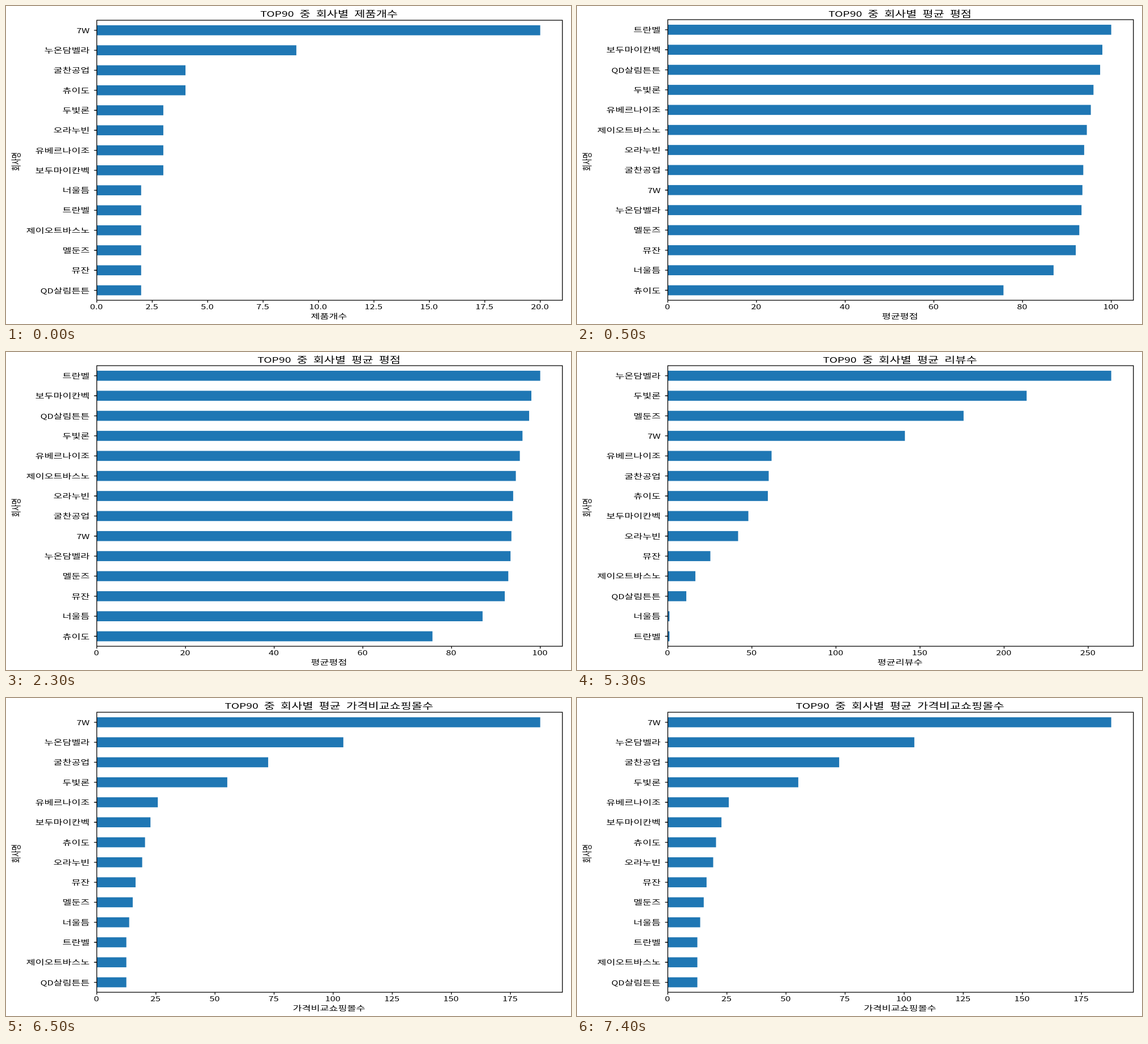
An HTML page that plays this animation: 998 px wide and 561 px high, repeating every 8 s.

```html
<!DOCTYPE html>
<html lang="ko">
<head>
<meta charset="utf-8">
<style>
  html, body { margin: 0; width: 100%; height: 100%; overflow: hidden; background: #fff; }
  svg { display: block; }
  text { font: 12px "Noto Sans CJK KR", "Noto Sans CJK", sans-serif; word-spacing: .2em; text-anchor: middle; }
  tspan { font-size: .93em; }
  .title { font-size: 14.4px; }
  .name { text-anchor: end; }
  .bar { fill: #1f77b4; }
  .axes { fill: none; stroke: #000; stroke-width: 1.3; }
</style>
</head>
<body>
<svg id="stage" width="998" height="561" viewBox="0 0 998 561"></svg>
<script>
const LEFT = 160.4, RIGHT = 982.8, BOTTOM = 519.2, STRETCH = 1.45;

const names = ['7W', '누온담벨라', '굴찬공업', '츄이도', '두빛론', '오라누빈', '유베르나이조',
  '보두마이칸벡', '너울틈', '트란벨', '제이오트바스노', '멜둔즈', '뮤잔', 'QD살림튼튼'];

// order: one hexadecimal index into names per row, top to bottom
const charts = [
  { end: 500, top: 25.2, title: '제품개수', label: '제품개수', step: 2.5, digits: 1,
    order: '0123456789abcd',
    values: [20, 9, 4, 4, 3, 3, 3, 3, 2, 2, 2, 2, 2, 2] },
  { end: 3500, top: 24.2, title: '평균 평점', label: '평균평점', step: 20, digits: 0,
    order: '97d46a5201bc83',
    values: [100, 98, 97.5, 96, 95.4, 94.5, 93.9, 93.7, 93.5, 93.3, 92.8, 92, 87, 75.7] },
  { end: 6500, top: 24.2, title: '평균 리뷰수', label: '평균리뷰수', step: 50, digits: 0,
    order: '14b062375cad89',
    values: [263.7, 213.4, 175.9, 141, 61.7, 60, 59.5, 47.9, 41.8, 25.3, 16.4, 11, 1, 1] },
  { end: 8000, top: 25.2, title: '평균 가격비교쇼핑몰수', label: '가격비교쇼핑몰수', step: 25, digits: 0,
    order: '01246735cb89ad',
    values: [187.6, 104.3, 72.5, 55.2, 25.8, 22.7, 20.4, 19.2, 16.4, 15.2, 13.7, 12.5, 12.5, 12.5] },
];

function text(x, y, content, cls = '', turn = 0) {
  const runs = content.replace(/[A-Z0-9.]+/g, '<tspan>$&</tspan>');
  return `<text class="${cls}" transform="translate(${x} ${y}) scale(${STRETCH} 1) rotate(${turn})">${runs}</text>`;
}

function chartMarkup({ top, title, label, step, digits, order, values }) {
  const center = (LEFT + RIGHT) / 2;
  const row = (BOTTOM - top) / values.length;
  const limit = values[0] * 1.05;
  const scale = (RIGHT - LEFT) / limit;
  let axes = `M${LEFT} ${top}H${RIGHT}V${BOTTOM}H${LEFT}Z`;
  let out = '';

  values.forEach((value, i) => {
    const y = top + (i + .5) * row;
    out += `<rect class="bar" x="${LEFT}" y="${y - row / 4}" width="${value * scale}" height="${row / 2}"/>`;
    out += text(147.8, y + 5, names[parseInt(order[i], 16)], 'name');
    axes += `M${LEFT} ${y}h-4.8`;
  });
  for (let value = 0; value <= limit; value += step) {
    const x = LEFT + value * scale;
    out += text(x - .7, 535.3, value.toFixed(digits));
    axes += `M${x} ${BOTTOM}v4`;
  }
  out += text(center - 1, 552.3, label);
  out += text(center - 1, 19.2, 'TOP90 중 회사별 ' + title, 'title');
  out += text(24, 274.5, '회사명', '', -90);
  return `<g>${out}<path class="axes" d="${axes}"/></g>`;
}

const stage = document.getElementById('stage');
stage.innerHTML = charts.map(chartMarkup).join('');
const groups = [...stage.children];

function draw() {
  const time = performance.now() % 8000;
  const current = charts.findIndex(chart => time < chart.end);
  groups.forEach((group, i) => group.style.display = i === current ? '' : 'none');
  requestAnimationFrame(draw);
}
draw();
</script>
</body>
</html>
```
